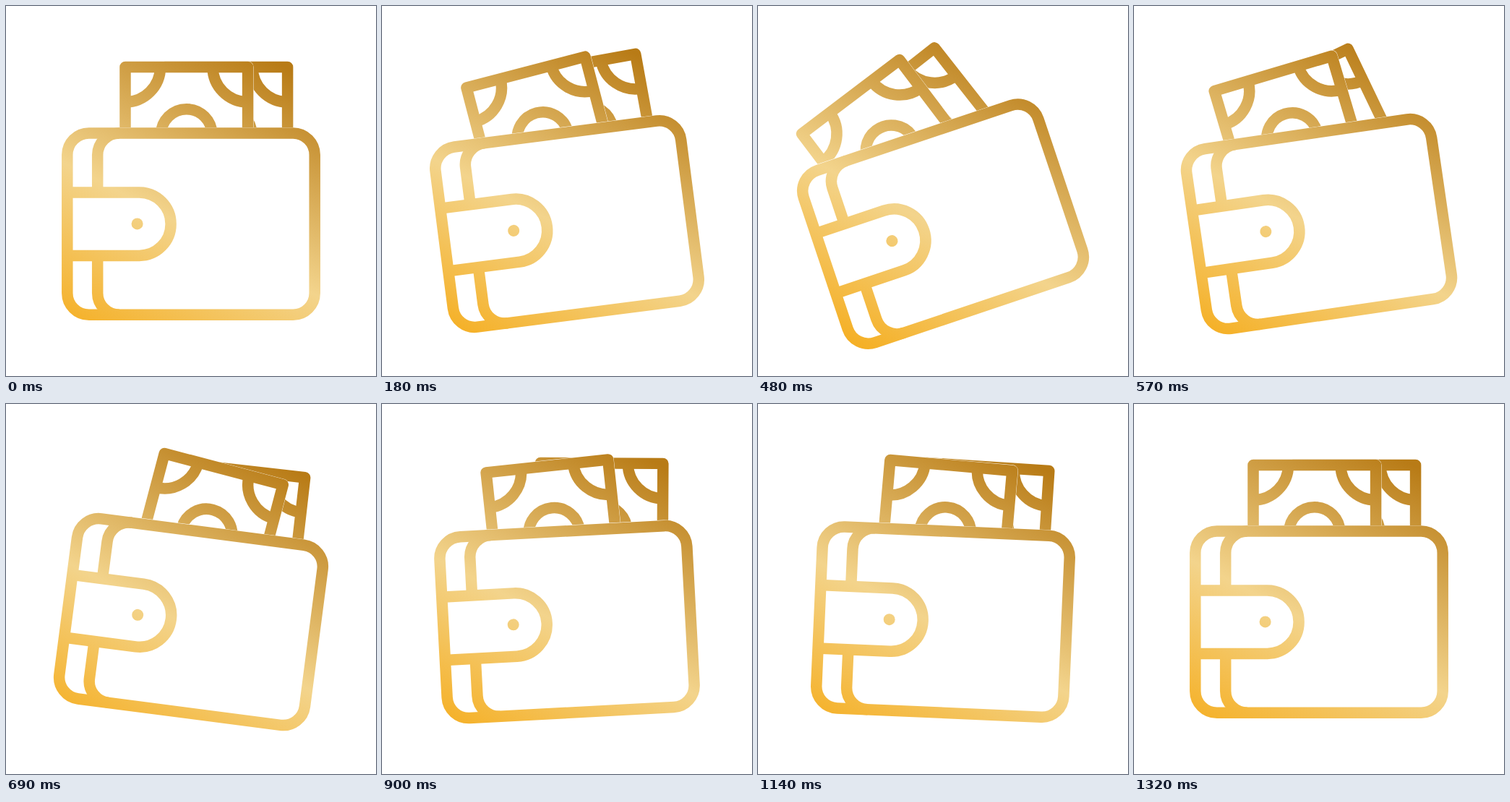
Write an HTML page that moves like this. It is 512 px wide and 512 px high and loops after 1500 ms.

```html
<!DOCTYPE html>
<html lang="en">
<head>
<meta charset="utf-8">
<title>Wallet</title>
<style>
  html, body { margin: 0; width: 100%; height: 100%; overflow: hidden; background: #fff; }
  svg { display: block; width: 100vw; height: 100vh; }
  .line { fill: none; stroke: #fff; stroke-width: 15.5; stroke-linejoin: round; }
  .cover { fill: #000; stroke: #000; stroke-width: 16.2; stroke-linejoin: round; }
</style>
</head>
<body>
<svg viewBox="0 0 512 512">
  <defs>
    <linearGradient id="gold" gradientUnits="userSpaceOnUse" x1="359" y1="70.4" x2="147" y2="473">
      <stop offset="0" stop-color="#b87b16"/>
      <stop offset=".57" stop-color="#f3d48c"/>
      <stop offset="1" stop-color="#f5b026"/>
    </linearGradient>
    <!-- Bill, with its origin at the middle of its bottom edge -->
    <g id="bill">
      <path class="cover" d="M-84.8 0V-185.5H84.8V0Z"/>
      <path class="line" d="M-84.8 0V-185.5H84.8V0Z"/>
      <path class="line" d="M-36.3 -185.5A48.5 48.5 0 0 1 -84.8 -137M36.3 -185.5A48.5 48.5 0 0 0 84.8 -137"/>
      <circle class="line" cy="-92" r="35.3"/>
    </g>
    <!-- Lines are white, covered areas black; the gradient stays still behind -->
    <mask id="shape" maskUnits="userSpaceOnUse" x="0" y="0" width="512" height="512">
      <g id="wallet">
        <use id="back" href="#bill"/>
        <use id="front" href="#bill"/>
        <rect class="cover" x="84.8" y="176" width="342.4" height="251.2" rx="30"/>
        <rect class="line" x="84.8" y="176" width="342.4" height="251.2" rx="30"/>
        <path class="line" d="M157 176A30 30 0 0 0 126.7 206V258M126.7 345.4V397.2A30 30 0 0 0 157 427.2"/>
        <path class="line" d="M84.8 258H184.4A43.7 43.7 0 0 1 184.4 345.4H84.8"/>
        <circle cx="181.6" cy="301.4" r="8" fill="#fff"/>
      </g>
    </mask>
  </defs>
  <rect width="512" height="512" fill="#fff"/>
  <rect width="512" height="512" fill="url(#gold)" mask="url(#shape)"/>
</svg>
<script>
  const LOOP = 1500, STEP = 30, LAST = 44;
  const SWING = [0, -20, 10, -5, 2.5, 0];
  const WALLET_KEYS = [0, 14.65, 24.85, 31.5, 38, 42];
  const BACK_KEYS = [2.4, 17.2, 27, 33.5, 39.6, 44];

  const wallet = document.getElementById('wallet');
  const front = document.getElementById('front');
  const back = document.getElementById('back');

  // Damped swing, eased in and out between its turning points
  function swing(keys, n) {
    if (n <= keys[0]) return 0;
    for (let i = 1; i < keys.length; i++) {
      if (n < keys[i]) {
        const u = (n - keys[i - 1]) / (keys[i] - keys[i - 1]);
        return SWING[i - 1] + (SWING[i] - SWING[i - 1]) * u * u * (3 - 2 * u);
      }
    }
    return 0;
  }

  function draw(ms) {
    const n = Math.min(LAST, Math.floor((ms % LOOP) / STEP));
    const angle = swing(WALLET_KEYS, n);
    wallet.setAttribute('transform', `rotate(${angle} 256 301.5)`);
    front.setAttribute('transform', `translate(249.8 270) rotate(${angle})`);
    back.setAttribute('transform', `translate(304.8 270) rotate(${swing(BACK_KEYS, n)})`);
  }

  const start = performance.now();
  function tick() {
    draw(performance.now() - start);
    requestAnimationFrame(tick);
  }
  tick();
</script>
</body>
</html>
```
